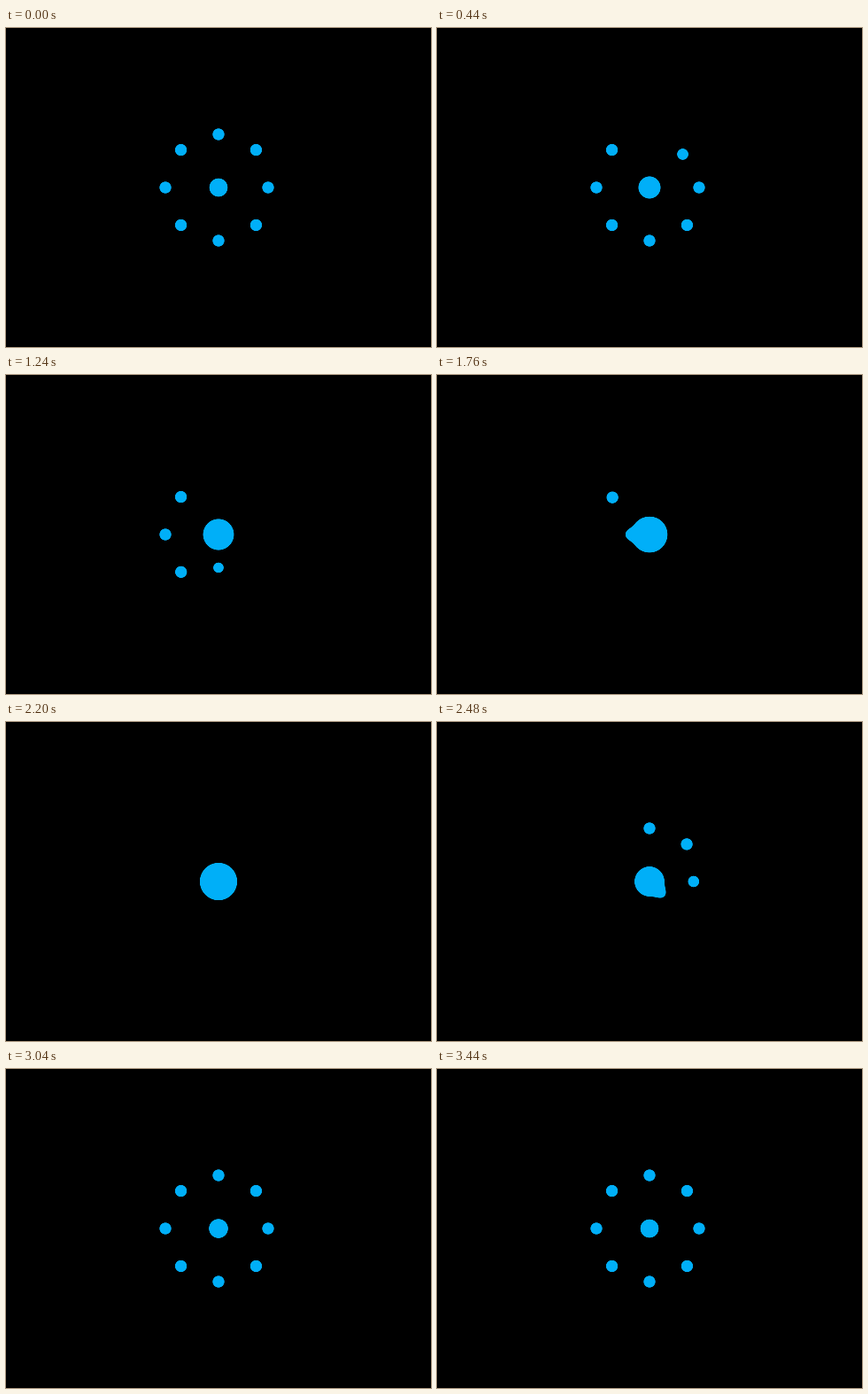
An HTML page without scripts that plays this animation: 480x360 px, repeating every 3480 ms.

```html
<!DOCTYPE html>
<html lang="en">
<head>
<meta charset="utf-8">
<title>Gooey dots loader</title>
<style>
html, body { margin: 0; width: 100%; height: 100%; overflow: hidden; background: #000; }
svg { display: block; width: 480px; height: 360px; }

.core { animation: core 3480ms linear infinite; }
.dot {
  --home: rotate(var(--angle)) translateY(var(--reach, -60px)) scale(1);
  --merged: rotate(var(--angle)) translateY(0px) scale(.78);
  transform: var(--home);
  animation: 3480ms cubic-bezier(.76, 0, .24, 1) infinite;
}

.n  { --angle: 0deg;   animation-name: n; }
.ne { --angle: 45deg;  animation-name: ne; }
.e  { --angle: 90deg;  animation-name: e; --reach: -56px; }
.se { --angle: 135deg; animation-name: se; }
.s  { --angle: 180deg; animation-name: s; }
.sw { --angle: 225deg; animation-name: sw; }
.w  { --angle: 270deg; animation-name: w; }
.nw { --angle: 315deg; animation-name: nw; }

@keyframes core {
  0%     { r: 10.5px; }
  16.1%  { r: 13px; }
  24.14% { r: 15.4px; }
  35.63% { r: 17.2px; }
  50.57% { r: 20px; }
  64.4%  { r: 20.8px; }
  79.3%  { r: 11.8px; }
  82.76% { r: 10.9px; }
  100%   { r: 10.5px; }
}

/* Dots merge 240ms apart and leave 80ms apart. */
@keyframes n  { 0%          { transform: var(--home); } 17.241%, 59.77%  { transform: var(--merged); } 70.115%, 100% { transform: var(--home); } }
@keyframes ne { 0%, 6.897%  { transform: var(--home); } 24.138%, 62.069% { transform: var(--merged); } 72.414%, 100% { transform: var(--home); } }
@keyframes e  { 0%, 13.793% { transform: var(--home); } 31.034%, 64.368% { transform: var(--merged); } 74.713%, 100% { transform: var(--home); } }
@keyframes se { 0%, 20.69%  { transform: var(--home); } 37.931%, 66.667% { transform: var(--merged); } 77.011%, 100% { transform: var(--home); } }
@keyframes s  { 0%, 27.586% { transform: var(--home); } 44.828%, 68.966% { transform: var(--merged); } 79.31%, 100%  { transform: var(--home); } }
@keyframes sw { 0%, 34.483% { transform: var(--home); } 51.724%, 71.264% { transform: var(--merged); } 81.609%, 100% { transform: var(--home); } }
@keyframes w  { 0%, 41.379% { transform: var(--home); } 58.621%, 73.563% { transform: var(--merged); } 83.908%, 100% { transform: var(--home); } }
@keyframes nw { 0%, 48.276% { transform: var(--home); } 65.517%, 75.862% { transform: var(--merged); } 86.207%, 100% { transform: var(--home); } }
</style>
</head>
<body>
<svg viewBox="0 0 480 360">
  <filter id="goo" filterUnits="userSpaceOnUse" x="-100" y="-100" width="200" height="200" color-interpolation-filters="sRGB">
    <feGaussianBlur stdDeviation="4"/>
    <feColorMatrix values="0 0 0 0 0  0 0 0 0 .686  0 0 0 0 .973  0 0 0 20 -8"/>
  </filter>
  <g transform="translate(240 180)" filter="url(#goo)">
    <circle class="core" r="10.5"/>
    <circle class="dot n" r="7.3"/>
    <circle class="dot ne" r="7.3"/>
    <circle class="dot e" r="7.3"/>
    <circle class="dot se" r="7.3"/>
    <circle class="dot s" r="7.3"/>
    <circle class="dot sw" r="7.3"/>
    <circle class="dot w" r="7.3"/>
    <circle class="dot nw" r="7.3"/>
  </g>
</svg>
</body>
</html>
```
